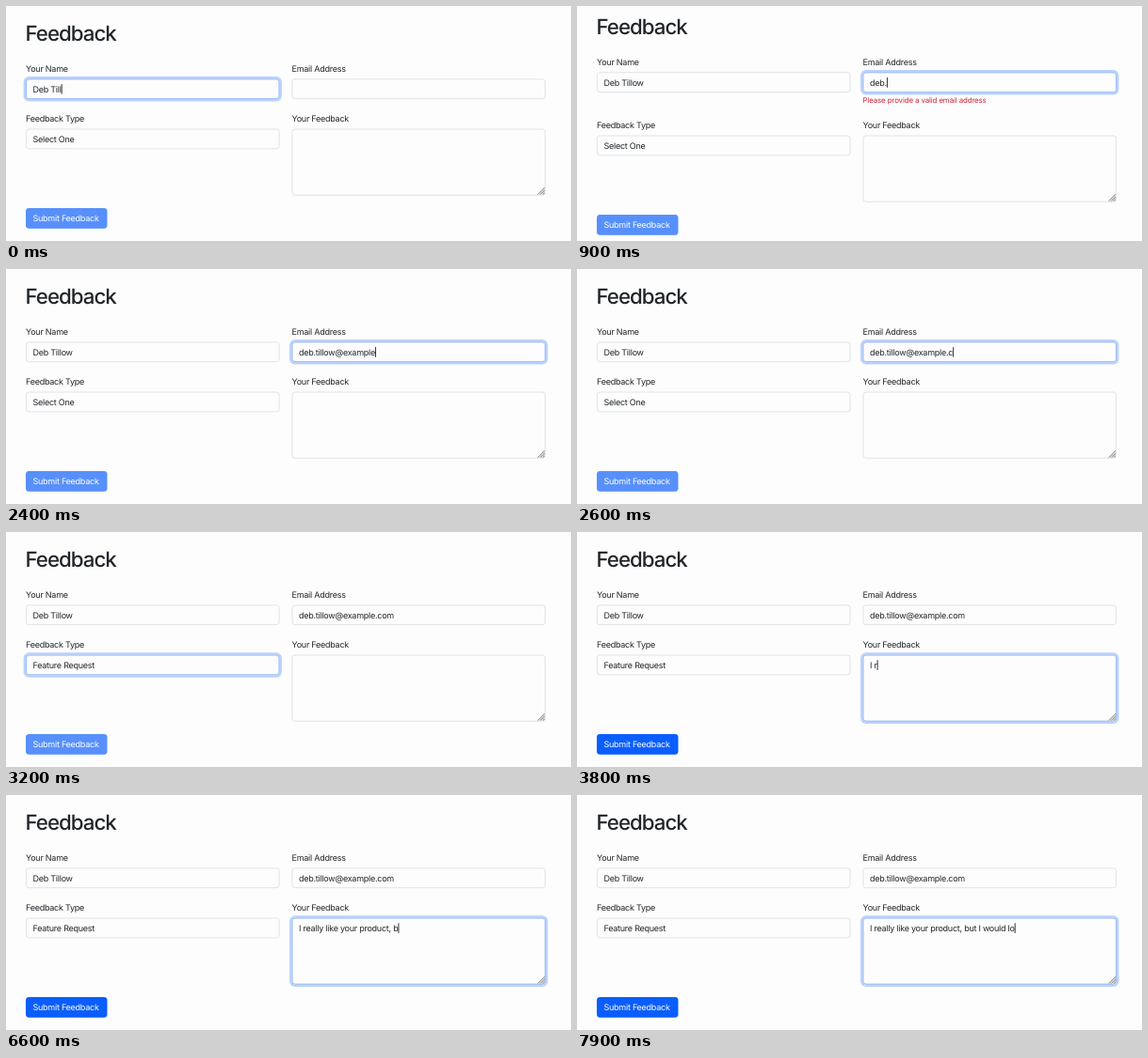
Write an HTML page with a canvas that moves like this. It is 600 by 250 pixels and loops after 8000 ms.

```html
<!DOCTYPE html>
<html lang="en">
<head>
<meta charset="utf-8">
<title>Feedback form</title>
<style>
  html, body { margin: 0; width: 100%; height: 100%; overflow: hidden; background: #fdfdfd; }
  canvas { display: block; width: 600px; height: 250px; }
</style>
</head>
<body>
<canvas id="stage"></canvas>
<script>
const W = 600, H = 250, LOOP = 8000, STEP = 100;
const LEFT = 21, RIGHT = 303.5, FIELD_W = 269.5, FIELD_H = 21.7, PAD = 7.5, RADIUS = 3.4;
const BACK = '#fdfdfd', INK = '#212529', BLUE = '10,94,253';
const NAME = 'Deb Tillow';
const EMAIL = 'deb.tillow@example.com';
const MESSAGE = 'I really like your product, but I would lo';

const canvas = document.getElementById('stage');
const ctx = canvas.getContext('2d');
const dpr = window.devicePixelRatio || 1;
canvas.width = W * dpr;
canvas.height = H * dpr;

const clamp = v => Math.max(0, Math.min(1, v));

// One letter per step from `start`, skipping the steps in `pauses`.
function typed(text, step, start, pauses = []) {
  const skipped = pauses.filter(p => p <= step).length;
  return text.slice(0, Math.max(0, step - start + 1 - skipped));
}

// Focus strength between two steps, with a short fade at both ends.
const focus = (step, from, to) =>
  Math.min(clamp(step - from + 0.5), clamp(to - step + 0.5));

function box(x, y, w, h, r) {
  ctx.beginPath();
  ctx.roundRect(x, y, w, h, r);
}

// `y` is the middle of the capital letters.
function write(text, x, y, { size = 9, weight = 400, spacing = -0.25, color = INK } = {}) {
  ctx.font = `${weight} ${size}px Inter, "Liberation Sans", sans-serif`;
  ctx.letterSpacing = spacing + 'px';
  ctx.textRendering = 'geometricPrecision';
  ctx.fillStyle = color;
  ctx.fillText(text, x, y + size * 0.3635);
  return ctx.measureText(text).width;
}

function field(x, y, h, text, glow, caret) {
  if (glow > 0) {
    const spread = 2.4 * glow;
    box(x - spread, y - spread, FIELD_W + 2 * spread, h + 2 * spread, RADIUS + spread);
    ctx.fillStyle = `rgba(${BLUE},${0.27 * glow})`;
    ctx.fill();
  }
  box(x, y, FIELD_W, h, RADIUS);
  ctx.fillStyle = BACK;
  ctx.fill();
  box(x + 0.4, y + 0.4, FIELD_W - 0.8, h - 0.8, RADIUS - 0.4);
  ctx.lineWidth = 0.8;
  ctx.strokeStyle = '#d9dce1';
  ctx.stroke();
  if (glow > 0) {
    ctx.strokeStyle = `rgba(130,175,253,${glow})`;
    ctx.stroke();
  }
  const width = write(text, x + PAD, y + 11);
  if (caret) {
    ctx.fillStyle = '#000';
    ctx.fillRect(x + PAD + width + 0.1, y + 5.7, 0.8, 10.6);
  }
}

function resizer(x, y) {
  ctx.beginPath();
  ctx.moveTo(x, y - 8);
  ctx.lineTo(x, y);
  ctx.lineTo(x - 8, y);
  ctx.fillStyle = '#d2d2d2';
  ctx.fill();
  ctx.beginPath();
  for (const d of [7.5, 4.5, 1.8]) {
    ctx.moveTo(x, y - d);
    ctx.lineTo(x - d, y);
  }
  ctx.lineWidth = 0.8;
  ctx.strokeStyle = '#8c8c8c';
  ctx.stroke();
}

function draw(step) {
  const invalid = (step >= 6 && step < 18) || step === 25;
  const shift = invalid ? 7 : 0;
  ctx.setTransform(dpr, 0, 0, dpr, 0, 0);
  ctx.fillStyle = BACK;
  ctx.fillRect(0, 0, W, H);

  // The form is centred: the error line pushes both halves apart.
  ctx.save();
  ctx.translate(0, -shift);
  write('Feedback', 20.5, 28.6, { size: 22.3, weight: 500, spacing: -1 });
  write('Your Name', LEFT, 66.4);
  write('Email Address', RIGHT, 66.4);
  field(LEFT, 77.4, FIELD_H, typed(NAME, step, -7), focus(step, -9, 3), step < 3);
  field(RIGHT, 77.4, FIELD_H, typed(EMAIL, step, 5, [6, 18]),
    focus(step, 3, 31), step >= 3 && step < 31);
  if (invalid) {
    write('Please provide a valid email address', RIGHT, 107.4,
      { size: 7.9, spacing: -0.12, color: '#cf2438' });
  }
  ctx.restore();

  ctx.save();
  ctx.translate(0, shift);
  write('Feedback Type', LEFT, 119.6);
  write('Your Feedback', RIGHT, 119.6);
  field(LEFT, 130.6, FIELD_H, step < 32 ? 'Select One' : 'Feature Request', focus(step, 31, 35), false);
  field(RIGHT, 130.6, 71, typed(MESSAGE, step, 36, [39, 61]), focus(step, 35, 99), step >= 35);
  resizer(572, 200.6);

  const enabled = clamp((step - 35) / 2);
  box(LEFT, 215, 86.5, 21.7, RADIUS);
  ctx.fillStyle = `rgba(${BLUE},${0.68 + 0.32 * enabled})`;
  ctx.fill();
  write('Submit Feedback', LEFT + PAD, 226, { color: '#fff' });
  ctx.restore();
}

const begin = performance.now();
function tick() {
  const time = (performance.now() - begin) % LOOP;
  draw(Math.floor(time / STEP));
  requestAnimationFrame(tick);
}
tick();
</script>
</body>
</html>
```
